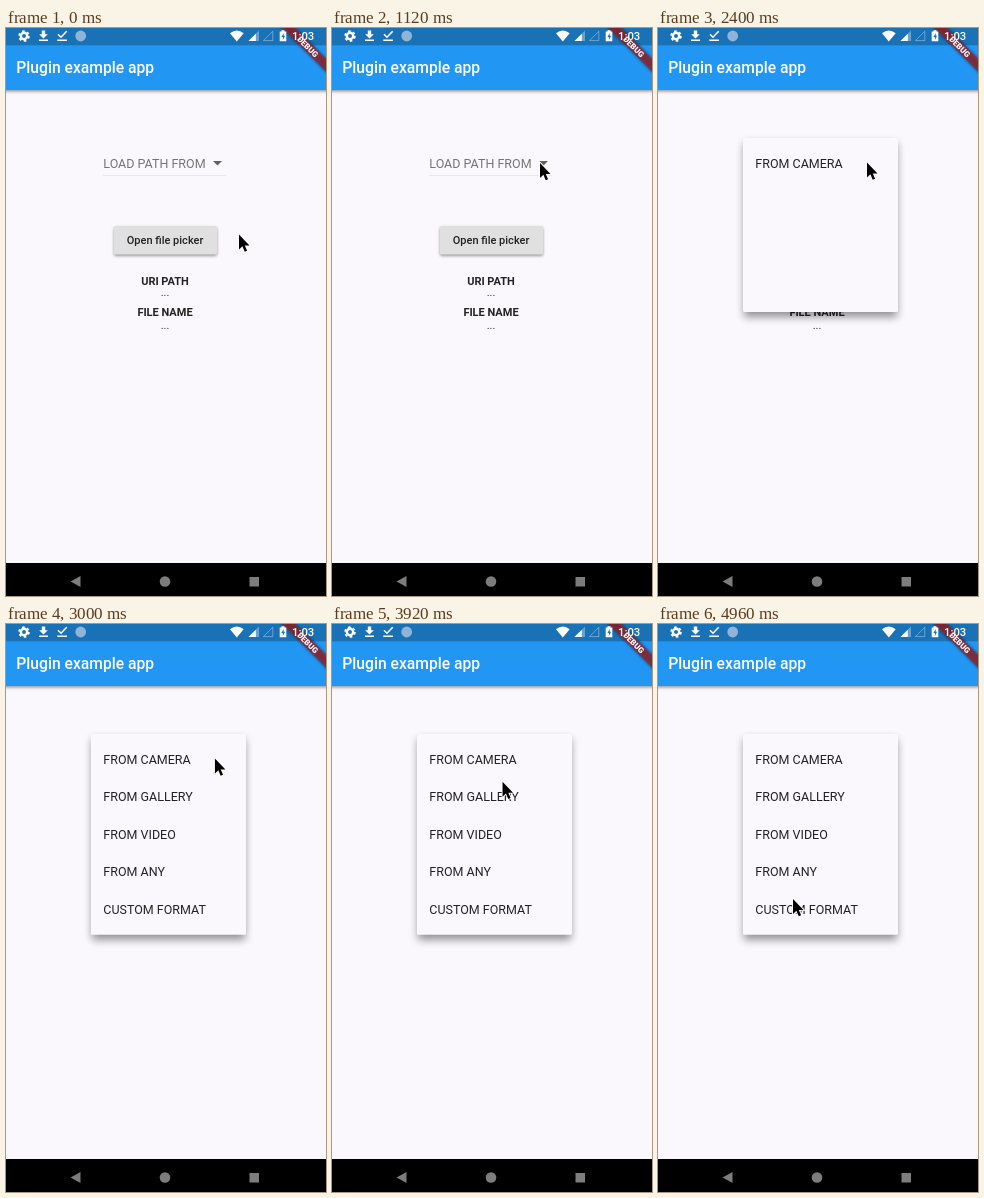
Write an HTML page that moves like this. It is 320 px wide and 568 px high and loops after 5 s.

```html
<!DOCTYPE html>
<html lang="en">
<head>
<meta charset="utf-8">
<title>Plugin example app</title>
<style>
  html, body { margin: 0; height: 100%; overflow: hidden; background: #faf8fd; }
  svg { display: block; width: 100%; height: 100%; }
  text { font-family: Roboto, sans-serif; fill: #222; }
  .item { font-size: 12.5px; }
  .small { font-size: 11px; text-anchor: middle; }
  .bold { font-weight: 700; }
  .medium { font-weight: 500; }
  .line { fill: none; stroke: #fff; }
</style>
</head>
<body>
<svg viewBox="0 0 320 568">
  <defs>
    <filter id="soft" x="-20%" y="-50%" width="140%" height="200%"><feGaussianBlur stdDeviation="1.5"/></filter>
    <filter id="deep" x="-20%" y="-20%" width="140%" height="140%"><feGaussianBlur stdDeviation="4"/></filter>
    <clipPath id="clip"><rect id="clipBox" x="85" y="110" width="155" height="201"/></clipPath>
  </defs>
  <rect width="320" height="568" fill="#faf8fd"/>

  <!-- app bar -->
  <rect x="-5" y="20" width="330" height="43.5" opacity=".4" filter="url(#soft)"/>
  <rect width="320" height="62" fill="#2196f3"/>
  <rect width="320" height="17.3" fill="#1971b6"/>
  <text class="medium" x="10.3" y="45.4" font-size="15.66" style="fill:#fff">Plugin example app</text>

  <!-- page -->
  <text class="item" x="97.3" y="139.5" style="fill:#757575">LOAD PATH FROM</text>
  <path d="M207 133h9l-4.5 4.5z" fill="#616161"/>
  <path d="M97 147.5H220" stroke="#e9e7ec"/>
  <rect x="108" y="199.5" width="103" height="28.5" rx="2" opacity=".4" filter="url(#soft)"/>
  <rect x="108" y="198" width="103" height="28.5" rx="1.6" fill="#e0e0e0"/>
  <text class="small medium" x="159" y="216">Open file picker</text>
  <text class="small bold" x="159" y="257">URI PATH</text>
  <text class="small" x="159" y="268">...</text>
  <text class="small bold" x="159" y="288.3">FILE NAME</text>
  <text class="small" x="159" y="300.5">...</text>

  <!-- debug ribbon -->
  <g transform="translate(320.5 0) rotate(45)">
    <rect x="-36" y="21.9" width="72" height="9.4" opacity=".5" filter="url(#soft)"/>
    <rect x="-36" y="21.9" width="72" height="9.4" fill="#b71c1c" opacity=".63"/>
    <text x="0" y="29.4" font-size="8" font-weight="900" text-anchor="middle" style="fill:#fff">DEBUG</text>
  </g>

  <!-- drop-down menu -->
  <g id="menu">
    <rect id="shade" x="86" y="115" width="153" height="200" opacity=".42" filter="url(#deep)"/>
    <rect id="panel" x="85" y="110" width="155" height="201" rx="1.6" fill="#faf8fd"/>
    <g id="items" clip-path="url(#clip)"></g>
  </g>

  <!-- status bar -->
  <g fill="#fff">
    <circle class="line" cx="18" cy="8" r="3.2" stroke-width="2.4"/>
    <circle class="line" cx="18" cy="8" r="4.9" stroke-width="1.8" stroke-dasharray="2.6 2.53"/>
    <path d="M35.8 2.5h3.4v3.7h2.6L37.5 10.4 33.2 6.2h2.6zM33 11.6h9v1.5h-9z"/>
    <path class="line" d="M52 6.2l3 3 5.7-6M51.3 12.3h9.6" stroke-width="1.6"/>
    <circle cx="74.7" cy="8" r="5.4" fill="#8fb4d8"/>
    <path d="M224 5.2Q230.8 -.4 237.7 5.2L230.8 13.4z"/>
    <path d="M242.5 13L253 2.5V13z" opacity=".35"/>
    <path d="M242.5 13L249.8 5.7V13z"/>
    <path class="line" d="M257.5 12.6L266.8 3.3V12.6z" stroke-width=".8" opacity=".45"/>
    <path d="M275.5 2.3h3v1.2h1.8v9.8h-6.6V3.500h1.800z"/>
    <path d="M277.700 5l-2.300 4h1.500v3l2.200-4.200h-1.400z" fill="#1971b6"/>
    <text x="286" y="12.3" font-size="11.3" class="medium" style="fill:#fff">1:03</text>
  </g>

  <!-- navigation bar -->
  <rect y="535" width="320" height="33"/>
  <g fill="#7d7d7d">
    <path d="M64.500 553.500L74.500 548v11z"/>
    <circle cx="159" cy="553.500" r="5.300"/>
    <rect x="243.500" y="549" width="9.500" height="9.500"/>
  </g>

  <path id="cursor" d="M0 0V15L3.400 11.800 5.700 17.200 8.100 16.200 5.800 10.900H10.500z"
        stroke="#fff" stroke-width="1.800" paint-order="stroke"/>
</svg>
<script>
const $ = id => document.getElementById(id);
const LOOP = 5000, STEP = 40, OPEN = 2400, PITCH = 37.6;
const clamp = v => Math.max(0, Math.min(1, v));
const smooth = p => p * p * (3 - 2 * p);
const slowDown = p => 1 - (1 - p) ** 1.6;

// time, x, y of the pointer tip, easing towards that point
const path = [
  [0, 233, 206.5], [520, 208, 135], [1840, 208, 135], [1880, 209, 134.5],
  [2960, 209, 134.5], [3520, 204, 136], [3640, 204, 136], [4160, 144, 175],
  [4400, 144, 175], [4440, 141, 196], [4960, 135, 275, slowDown]
];

const items = ['FROM CAMERA', 'FROM GALLERY', 'FROM VIDEO', 'FROM ANY', 'CUSTOM FORMAT']
  .map((label, i) => {
    const el = document.createElementNS('http://www.w3.org/2000/svg', 'text');
    el.setAttribute('class', 'item');
    el.setAttribute('x', 97.3);
    el.setAttribute('y', 139.5 + i * PITCH);
    el.textContent = label;
    $('items').append(el);
    return el;
  });

function pointer(t) {
  const i = Math.max(1, path.findIndex(k => k[0] >= t));
  const [t0, x0, y0] = path[i - 1], [t1, x1, y1, ease = smooth] = path[i];
  const p = ease((t - t0) / (t1 - t0));
  return [x0 + (x1 - x0) * p, y0 + (y1 - y0) * p];
}

function drawMenu(t) {
  $('menu').style.display = t < OPEN ? 'none' : '';
  const p = clamp(0.459 + (t - OPEN) / 222);
  const height = PITCH + 163.2 * clamp((p - 0.25) * 4);
  for (const id of ['panel', 'shade', 'clipBox']) $(id).setAttribute('height', height);
  const unit = 0.5 / (items.length + 1.5);
  items.forEach((el, i) => {
    const start = 0.5 + (i + 1) * unit;
    el.style.opacity = i ? clamp((p - start) / (1.5 * unit)) : 1;
  });
}

function frame(now) {
  const t = Math.floor(now % LOOP / STEP) * STEP;
  drawMenu(t);
  $('cursor').setAttribute('transform', `translate(${pointer(t)})`);
  requestAnimationFrame(frame);
}
frame(0);
</script>
</body>
</html>
```
